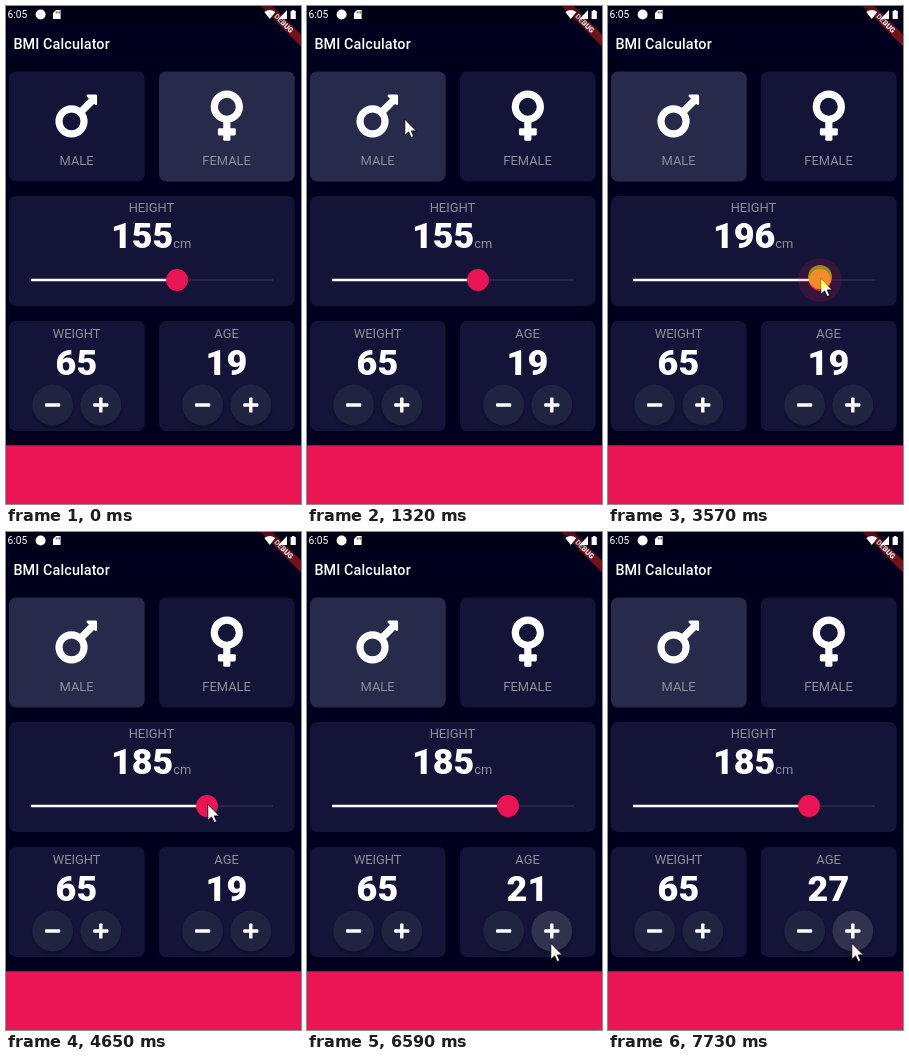
Write an HTML page that moves like this. It is 295 px wide and 498 px high and loops after 8000 ms.

```html
<!DOCTYPE html>
<html lang="en">
<head>
<meta charset="utf-8">
<title>BMI Calculator</title>
<style>
  html, body { margin: 0; width: 100%; height: 100%; overflow: hidden; background: #00001e; }
  svg { display: block; width: 295px; height: 498px; font-family: Roboto, Arial, sans-serif; }
  .card { fill: #131437; }
  .card.on { fill: #272a4b; }
  .label { font-size: 12.9px; fill: #8d8e98; text-anchor: middle; }
  .num { font-size: 35.9px; font-weight: 900; fill: #fff; text-anchor: middle; }
  .num .unit { font-size: 12.9px; font-weight: 400; fill: #8d8e98; }
  .white { fill: #fff; }
</style>
</head>
<body>
<svg viewBox="0 0 295 498">
  <defs>
    <filter id="soft" x="-30%" y="-30%" width="160%" height="160%"><feGaussianBlur stdDeviation="1.6"/></filter>
    <linearGradient id="fade" x2="0" y2="1">
      <stop stop-opacity=".4"/><stop offset="1" stop-opacity="0"/>
    </linearGradient>
    <rect id="card" width="135.7" height="110" rx="7"/>
    <g id="button">
      <circle cy="2" r="20" fill="#000" opacity=".3" filter="url(#soft)"/>
      <circle r="20.4" fill="#212440"/>
    </g>
    <rect id="bar" x="-7.6" y="-1.7" width="15.2" height="3.4" rx=".9" fill="#fff"/>
    <g id="plus"><use href="#bar"/><use href="#bar" transform="rotate(90)"/></g>
  </defs>
  <rect width="295" height="498" fill="#00001e"/>
  <rect y="57.4" width="295" height="4" fill="url(#fade)"/>
  <text class="white" x="7.4" y="42.8" font-size="14.35" font-weight="500" letter-spacing=".12">BMI Calculator</text>

  <use id="male" class="card" href="#card" x="3" y="65.5"/>
  <use id="female" class="card" href="#card" x="153" y="65.5"/>
  <rect class="card" x="3" y="190" width="285.7" height="110" rx="7"/>
  <use class="card" href="#card" x="3" y="315"/>
  <use class="card" href="#card" x="153" y="315"/>

  <g transform="translate(49.4 81.3) scale(.112)" stroke="#fff" stroke-width="64" fill="none">
    <circle cx="144" cy="304" r="112"/>
    <path d="M233 215L340 108"/>
    <path d="M290 76H360V146Z" stroke-width="24" stroke-linejoin="round" fill="#fff"/>
  </g>
  <g transform="translate(204.7 81) scale(.112)" fill="#fff">
    <circle cx="144" cy="176" r="112" fill="none" stroke="#fff" stroke-width="64"/>
    <rect x="112" y="300" width="64" height="180" rx="12"/>
    <rect x="64" y="368" width="160" height="64" rx="12"/>
  </g>
  <text class="label" x="70.6" y="159">MALE</text>
  <text class="label" x="220.6" y="159">FEMALE</text>

  <text class="label" x="145.4" y="206">HEIGHT</text>
  <text class="num" x="145.2" y="242.4"><tspan id="height">155</tspan><tspan class="unit">cm</tspan></text>
  <path d="M25 274H267" stroke="#252649" stroke-width="2"/>
  <path id="track" stroke="#fff" stroke-width="2.3"/>
  <circle id="halo" cy="274" fill="#eb1555" opacity=".16"/>
  <circle id="thumb" cy="274" r="10.9" fill="#eb1555"/>

  <text class="label" x="70.6" y="332">WEIGHT</text>
  <text class="num" x="70.4" y="368.8">65</text>
  <text class="label" x="220.6" y="332">AGE</text>
  <text class="num" id="age" x="220.4" y="368.8">19</text>
  <g transform="translate(46.6 399)"><use href="#button"/><use href="#bar"/></g>
  <g transform="translate(94.8 399)"><use href="#button"/><use href="#plus"/></g>
  <g transform="translate(196.6 399)"><use href="#button"/><use href="#bar"/></g>
  <g transform="translate(244.8 399)">
    <use href="#button"/>
    <circle id="press" r="20.4" fill="#fff"/>
    <use href="#plus"/>
  </g>
  <rect y="439.3" width="295" height="58.7" fill="#eb1555"/>

  <g transform="translate(295 0) rotate(45)">
    <rect x="-29" y="20.1" width="58" height="8.6" fill="#b71c1c" fill-opacity=".63"/>
    <text class="white" y="27" font-size="7.3" font-weight="900" text-anchor="middle">DEBUG</text>
  </g>
  <rect width="295" height="17" fill="#000" opacity=".25"/>
  <g class="white">
    <text x="1.5" y="12.3" font-size="10.2">6:05</text>
    <circle cx="34.6" cy="8.5" r="5"/>
    <path d="M50 4H54.6V13H47V7Z"/>
    <path d="M258.3 6Q263.8 2 269.3 6L263.8 13Z"/>
    <path d="M281 4V13H272.5Z"/>
    <path d="M284.6 5H286V4H288.4V5H289.8V13H284.6Z"/>
  </g>
  <path d="M50.3 5.4V7.4M52 5.4V7.4M53.6 5.4V7.4" stroke="#000018" stroke-width=".7"/>

  <g id="cursor">
    <path d="M.8 1.2V17.4L4.6 13.9L7.2 19.6L9.7 18.5L7.2 12.9H12.3Z" fill="#fff" stroke="#000" stroke-width=".8"/>
    <circle id="busy" cx="14.7" cy="1" r="5.4" fill="#12233f" stroke="#2b93e6" stroke-width="3.4"/>
    <circle id="glow" r="12" fill="#ff0" opacity=".5"/>
  </g>
</svg>
<script>
  // The screen refreshes in even ticks; all times below count ticks.
  const LOOP = 8000, TICK = 77.3, LEAD = 25;
  const SELECT = 17, GRAB = 36, DROP = 59;
  const TAP_START = 81, FIRST_TAP = 82, TAP_GAP = 2.4, TAPS = 8;

  const START = { x: 198, y: 500 };
  const glides = [
    { from: 1, until: 13, x: 97, y: 112, bend: [-58, 0] },
    { from: 21, until: 32, x: 168, y: 270, bend: [50, 55] },
    { from: GRAB, until: 46, x: 212, y: 271 },
    { from: 49, until: 56, x: 201, y: 271 },
    { from: 64, until: 71, x: 196, y: 407, bend: [-6, 0] },
    { from: 75, until: 77, x: 243, y: 410 }
  ];

  const $ = id => document.getElementById(id);
  const show = (id, on) => $(id).style.display = on ? '' : 'none';
  const ramp = (k, from, until) => Math.max(0, Math.min(1, (k - from) / (until - from)));
  const easeOut = p => 1 - (1 - p) ** 2;

  function pointer(k) {
    let { x, y } = START;
    for (const g of glides) {
      const p = easeOut(ramp(k, g.from, g.until));
      const [bx, by] = g.bend || [0, 0];
      const swing = Math.sin(Math.PI * p);
      x += (g.x - x) * p + bx * swing;
      y += (g.y - y) * p + by * swing;
    }
    return { x, y };
  }

  function draw(time) {
    const k = Math.floor((time + LEAD) / TICK);
    const { x, y } = pointer(k);
    $('cursor').setAttribute('transform', `translate(${x} ${y})`);

    $('male').classList.toggle('on', k >= SELECT);
    $('female').classList.toggle('on', k < SELECT);

    const thumb = k < GRAB ? 171 : Math.round(pointer(Math.min(k, DROP)).x);
    $('height').textContent = thumb - 16;
    $('track').setAttribute('d', `M25 274H${thumb}`);
    $('thumb').setAttribute('cx', thumb);
    $('halo').setAttribute('cx', thumb);
    $('halo').setAttribute('r', 21.8 * Math.min(ramp(k, GRAB, GRAB + 2), 1 - ramp(k, DROP - 1, DROP + 2)));
    show('glow', k >= GRAB && k < DROP);

    const beat = (k - FIRST_TAP) / TAP_GAP;
    const taps = Math.max(0, Math.min(TAPS, Math.floor(beat) + 1));
    const pressed = beat - Math.floor(beat) > .6;
    $('age').textContent = 19 + taps;
    $('press').setAttribute('opacity', k < TAP_START ? 0 : pressed ? .13 : .07);
    show('busy', k === 90 || k === 91);
  }

  function tick(now) {
    draw(now % LOOP);
    requestAnimationFrame(tick);
  }
  draw(0);
  requestAnimationFrame(tick);
</script>
</body>
</html>
```
